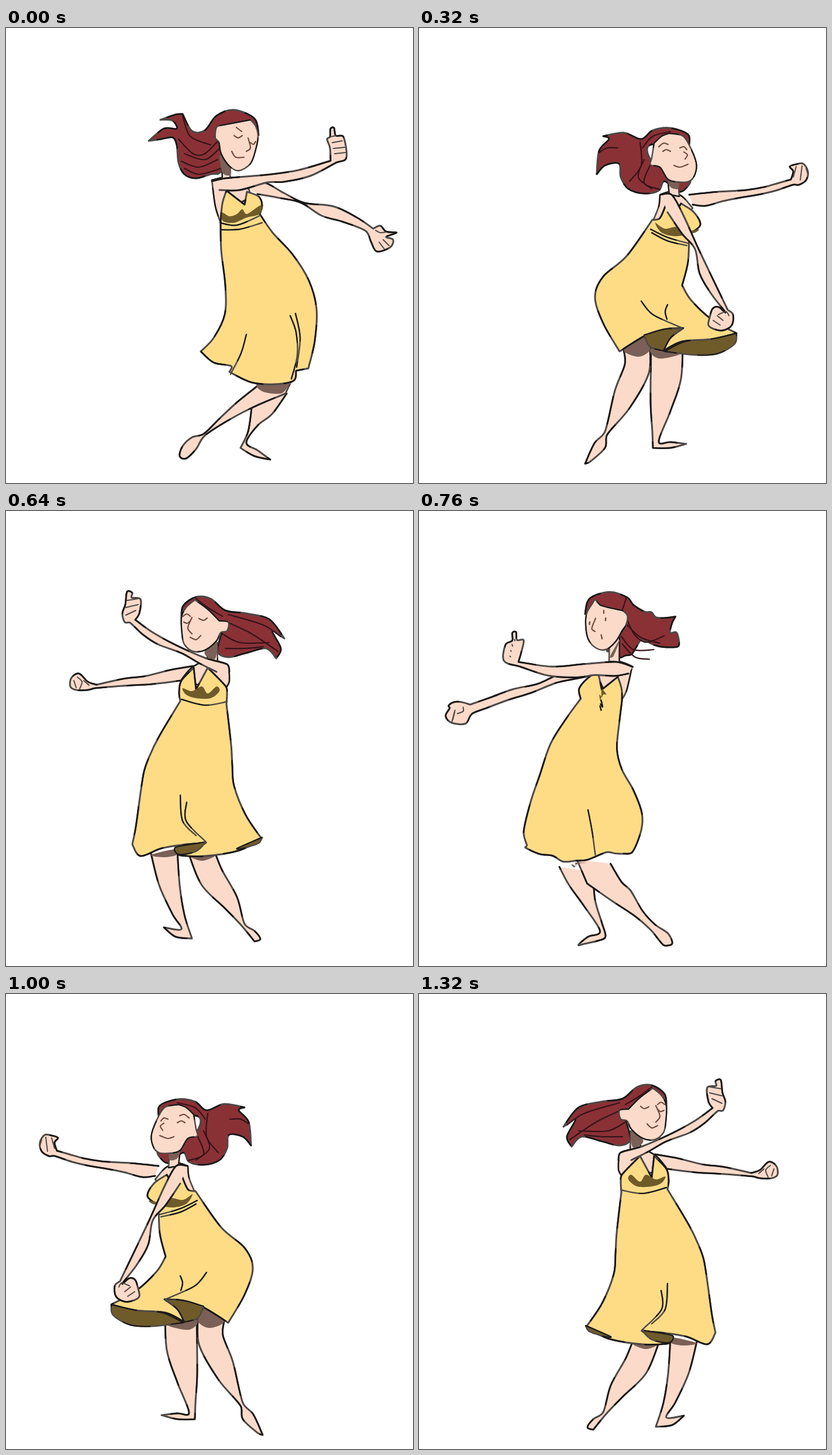
Animation, 696 px wide and 778 px high, one loop 1360 ms. Source, as an HTML page with a canvas:

```html
<!DOCTYPE html>
<html lang="en">
<head>
<meta charset="utf-8">
<title>Dance</title>
<style>
html, body { margin: 0; width: 100%; height: 100%; overflow: hidden; background: #fff; }
canvas { display: block; width: 100vw; height: 100vh; }
</style>
</head>
<body>
<canvas id="stage" width="696" height="778"></canvas>
<script>
const ctx = document.getElementById('stage').getContext('2d');
const SKIN = '#fcdac9', HAIR = '#8a3136', DRESS = '#fedc86', OLIVE = '#6f5a2a', SHADE = '#7a6056';
const HALF = 680, STEP = 80, MIRROR_X = 723, MIRROR_Y = 9;

// Back to front: part, fill, line width, closed outline
const LAYERS = [
  ['hair', HAIR, 3, true], ['strands', null, 2.2], ['far', SKIN, 3], ['farHand', null, 2],
  ['legR', SKIN, 3], ['legL', SKIN, 3], ['shade', SHADE, 0, true],
  ['torso', SKIN, 2.6, true], ['neck', SKIN, 2.4], ['neckShade', SHADE, 0, true],
  ['dress', DRESS, 3, true], ['under', OLIVE, 2.4, true], ['bust', OLIVE, 0, true], ['folds', null, 2.4],
  ['head', SKIN, 2.4, true], ['face', null, 2.2], ['near', SKIN, 3], ['nearHand', null, 2]
];

// Points run along smooth curves; * makes a corner, | starts a new curve
const leanBack = {
  hair: '432,183* 425,155 390,140 360,150 340,175 318,176 302,147* 290,148 264,157* 284,158 292,172 270,172 244,193* 265,190 285,187 292,200 295,230 305,250 325,257 350,250 367,246 372,215 365,185',
  strands: '365,190 340,215 320,215 295,190|366,205 340,225 305,215|362,225 330,238 300,228|368,240 330,250 305,240|302,150 315,185 350,200',
  far: '413,275* 440,264 475,282 510,299 560,305 600,324 628,343* 640,338 650,348 668,350 650,357 662,362 657,375 634,382 624,365 615,347 575,331 540,321 505,299 470,291 430,284*',
  farHand: '645,362 655,372|638,366 647,378|632,346 640,350 650,349',
  legL: '430,612* 395,640 365,668 338,694 318,700 302,715 297,732 308,736 325,720 340,697 385,668 430,645 478,625* 488,603*',
  legR: '420,650* 414,690 401,718* 425,732 452,738* 430,722 411,709 430,680 455,660 480,625*',
  shade: '428,610 440,622 470,625 483,612 492,600 450,604',
  torso: '352,260* 383,255 412,272 420,290* 400,300 375,330 367,333* 358,305',
  neck: '368,212 370,258* 383,258* 384,238',
  neckShade: '366,217 384,240 383,252 370,247',
  dress: '377,278* 408,302* 412,280* 432,288 438,303 434,318* 456,350 490,387 518,432 531,480 528,535 517,582* 496,586* 492,603 460,609 420,606 382,588* 385,578 355,572 333,553* 355,530 374,490 375,440 368,380 367,330* 370,300',
  bust: '370,316 382,322 395,318 404,310 412,318 436,303 434,318 412,324 390,333 371,330',
  folds: '366,333 395,337 436,320|411,524 402,556 384,592|368,345 400,344 438,333|486,492 496,520 498,560 488,600|495,488 503,530 497,580',
  head: '370,166* 418,157* 427,168 431,185 427,208 418,232 398,244 382,236 368,215 364,195 358,188 360,170',
  face: '418,196 423,199 427,194|390,184 397,188 404,184|414,188 418,205 411,211|386,211 393,221 407,221|394,170 403,177',
  near: '352,262* 375,257 445,251 500,243 555,227* 554,205 549,190 554,186 555,172 561,171 564,184 577,186 582,222 565,230 520,253 475,263 447,264 400,277 365,277',
  nearHand: '558,196 575,193|560,206 579,204|562,215 580,213|555,186 564,184'
};

const reach = {
  flip: true,
  hair: '277,160* 285,136 318,128 350,137 368,160 374,190 390,208 415,208 418,195* 427,215 428,235 410,257 385,264 355,262 330,245 325,235 300,250 288,235 287,222* 320,215 340,190',
  strands: '350,165 355,200 375,225 410,228|335,215 350,240 385,250|345,150 365,185 400,215|340,205 345,240 370,258|288,138 281,155',
  far: '305,250* 270,258 220,272 190,284 160,295 120,305 80,310* 60,306 45,297 46,307 32,308 30,330 45,340 70,336 82,320 120,319 160,305 200,292 250,280 270,276 290,272*',
  farHand: '45,310 55,318 48,332|37,312 42,325 36,335|60,316 68,326 58,335',
  legL: '362,585* 365,620 380,665 402,705 430,720 440,738 425,741 408,725 400,708 365,678 330,640 305,580*',
  legR: '292,576* 293,630 303,680 316,728* 295,733 274,737* 285,725 307,718 270,660 245,610 237,583*',
  shade: '240,584 290,572 290,598 265,602|300,573 362,585 345,592 310,590',
  torso: '358,262* 340,250 310,247 290,262* 300,300 337,305* 345,300',
  neck: '331,212 332,250* 310,247* 312,215',
  neckShade: '330,214 326,248 313,240 308,226',
  dress: '334,280* 310,300* 300,255* 275,285 262,298 264,315* 237,350 217,400 207,465 190,505 163,553* 158,560 185,578 230,584 262,587 272,578* 300,570 330,574 362,585* 370,530 372,470 365,415 345,385 329,365 330,335 338,312* 340,300',
  under: '158,556* 190,558 225,570 240,582* 200,579 170,568|262,588 268,575 290,572 280,583',
  bust: '264,303 285,306 300,303 315,308 330,300 338,297 335,306 310,314 290,313 268,312',
  folds: '264,318 300,324 336,318|266,489 271,530 264,575|267,325 300,328 334,325',
  head: '345,166* 318,157 298,138* 282,155 274,172 274,198 283,217 300,228 318,222 336,205 343,192 350,180',
  face: '278,178 283,180 288,176|305,174 312,178 320,173|295,170 294,180 286,188 290,192|286,203 296,207 309,200|303,161 312,164',
  near: '360,262* 325,250 290,263 230,280 172,280* 180,272 184,243 166,246 164,233 157,237 160,250 150,262 150,282 190,294 240,301 290,297 325,288 345,278 358,270',
  nearHand: '155,257 170,254|152,265 170,264|152,275 168,274|160,249 168,246'
};

const sway = {
  hair: '462,200* 460,182 430,171 400,175 380,190 350,179 315,185* 325,190 308,210 304,250* 318,235 342,232 345,255 358,275 385,283 410,278 420,262 445,280 460,270 463,258 440,250 400,230 395,200',
  strands: '395,235 385,265 412,276|385,225 375,255 398,275|378,195 380,235 360,262|308,213 322,205 340,205|382,205 400,185 430,177',
  far: '462,285* 500,281 530,279 560,277 590,272 615,265 636,259* 640,245 634,237 645,233 657,232 665,245 662,260 650,268 640,268 610,278 580,285 550,290 520,296 490,304 468,302*',
  farHand: '645,237 640,255|655,236 652,260|662,240 665,250',
  legL: '350,550* 352,575 335,620 318,690 300,710 284,745* 292,742 318,718 322,695 360,650 393,590 394,535*',
  legR: '397,540* 396,640 399,690 400,718* 430,718 457,711* 430,708 410,707 430,655 448,600 451,535*',
  shade: '350,550 385,528 395,550 375,562|397,548 450,538 450,556 410,565',
  torso: '412,285* 430,280 450,288 468,308* 455,320 425,330 400,330* 410,305',
  neck: '425,255 428,285* 445,288* 443,260',
  neckShade: '425,257 443,262 443,275 430,272',
  dress: '423,300* 437,320* 448,300* 470,315 481,337 462,352* 460,400 450,440* 465,465 500,498 543,522* 500,532 450,536 418,552* 430,530 452,513* 420,515 385,527 343,553* 315,505 301,460 315,425 355,390 399,328* 412,325',
  under: '385,525* 420,515 450,514* 430,530 418,552* 395,545|420,553* 455,536 500,532 543,522* 540,540 510,557 470,559',
  bust: '404,333 420,343 440,340 455,348 478,344 472,350 440,356 415,350',
  folds: '396,344 425,358 460,368|380,467 400,490 448,512|398,350 425,364 458,372|425,473 421,485 424,498',
  head: '402,197* 415,185 428,180* 450,184 461,198 474,230 472,250 462,262 440,263 425,258 412,238 396,234 398,222',
  face: '446,205 453,203 458,208|417,211 423,208 430,211|453,212 459,217 455,224|436,235 446,238 460,233|410,203 418,197 426,199',
  near: '413,285* 432,285 452,320 480,382 528,482* 537,490 535,508 520,517 505,515 495,508 497,495 502,480 512,477 524,486 500,455 480,420 472,378 450,352 425,315',
  nearHand: '512,490 525,485 530,492|510,492 520,500|503,500 515,508'
};

const point = {
  hair: '403,165* 395,148 372,135 340,137 315,160 314,185 325,210 333,222 313,240 325,262 294,262* 305,280 335,282 343,262 362,285 375,245 400,235 425,265 440,262 447,240 440,210 420,170',
  strands: '330,175 340,220 365,255|345,145 330,165 325,190|415,180 430,220 435,255|410,200 425,250|320,235 340,240 330,265',
  far: '405,215* 430,185 455,158 480,140 510,122 530,112 550,106* 565,101 610,108 609,131 600,130 590,134 578,130 565,123 556,117 530,138 495,158 480,163 455,185 435,212 410,240*',
  farHand: '592,110 595,130|603,110 604,130|580,120 588,133',
  legL: '301,523* 304,600 312,710 305,710 287,685* 292,708 305,722 318,726* 320,700 335,620 352,545*',
  legR: '380,548* 388,620 396,680 395,712* 402,718 425,700 434,681* 420,695 403,702 420,640 440,542*',
  shade: '302,519 345,517 350,545 320,542|382,546 440,542 436,552 400,558',
  torso: '362,243* 385,230 410,240 425,255* 400,265 370,290*',
  neck: '360,212 362,238* 392,240* 390,215',
  neckShade: '360,215 388,220 380,230',
  dress: '375,245* 392,265 405,258 408,243* 430,255 428,285 425,300* 433,350 445,400 460,470 464,520 473,549* 445,545 400,550 358,552 350,535 355,525 330,517 300,520 270,532 237,540* 265,505 282,460 290,430 310,400 330,375 350,330 366,295* 370,270',
  under: '237,540* 270,531 300,522* 302,553* 265,550|352,553 380,550 380,566 362,562|438,545 473,549 468,557 440,559|346,522 362,522 360,540 350,545',
  bust: '370,280 395,285 408,277 415,280 430,272 425,290 390,295 372,292',
  folds: '366,297 395,302 425,297|400,473 380,490 368,522',
  head: '344,178* 350,160 370,140* 395,160 406,178 405,200 390,218 375,222 360,215 350,203 338,198 334,185',
  face: '390,175 395,171 400,177|357,175 363,171 370,176|385,172 391,181 384,187|372,197 382,201 393,195|352,163 360,158 368,159',
  near: '365,243* 380,228 430,204 490,186 545,176* 560,180 590,190 606,200 603,205 590,203 583,213 565,212 560,200 545,182 500,206 460,213 435,215 400,228 372,245',
  nearHand: '575,196 590,200|570,205 578,210'
};

const turned = {
  hair: '300,183* 303,162 325,147 350,150 375,170 410,175 450,185 476,218* 455,205 470,235 462,252* 445,235 410,243 380,250 362,240 370,205 375,190',
  strands: '378,190 420,210 465,240|370,210 400,225 450,225|375,235 410,235 440,232|380,177 440,195 470,215|325,150 345,165 370,180',
  far: '320,265* 280,272 240,282 200,287 155,297* 140,292 125,278 112,285 110,300 120,306 140,306 152,303 200,299 250,296 298,290*',
  farHand: '122,284 130,292 126,304|116,290 120,302|133,290 142,298',
  legL: '248,586* 262,640 285,690 300,715 270,712* 290,728 318,731* 305,690 297,640 293,580*',
  legR: '313,588* 335,640 375,680 402,708 425,736* 435,732 425,718 408,706 395,660 370,615 358,586*',
  shade: '248,588 292,578 292,588 270,592|312,588 358,588 335,598',
  torso: '300,288* 320,266 350,255 378,265 382,290 378,300* 340,300',
  neck: '343,235 345,258* 362,260* 361,225',
  neckShade: '340,240 360,225 358,252 345,250',
  dress: '321,268* 325,305* 345,268* 376,300 378,312 377,330* 385,400 387,435 390,470 410,520 437,560* 400,580 340,590 295,588 320,580 342,567* 300,571 265,577 230,590 216,570* 222,540 235,450 245,420 262,385 298,325* 296,310 300,290',
  under: '290,575 342,566* 325,582 295,587|395,577 438,558* 432,568 400,578',
  bust: '302,303 318,308 335,300 345,312 360,300 365,308 350,320 325,320 308,314',
  folds: '300,322 340,332 378,326|309,498 308,530 342,566|298,486 302,530 325,555',
  head: '365,188* 345,168 323,152* 308,165 300,182 301,210 305,228 320,240 340,238 360,222 367,208 378,205 380,190',
  face: '304,190 310,192 315,188|330,184 338,187 344,183|318,182 311,200 318,210|315,216 325,220 333,213|303,180 309,176 315,180',
  near: '382,275* 378,262 340,251 290,229 250,207 221,186* 228,175 230,151 215,148 216,140 207,138 204,160 199,175 203,190 212,191 235,212 260,228 300,243 330,260 360,275',
  nearHand: '207,153 225,150|205,165 226,160|205,178 222,170'
};

const overhead = {
  hair: '385,165* 372,148 350,142 325,150 310,175 308,215 300,245 320,262 350,255 385,262 405,240 398,215 392,180',
  strands: '335,155 318,190 315,245|375,155 392,200 392,245',
  head: '325,190* 333,165 352,148* 375,165 384,190 382,210 365,230 350,233 335,225 327,212 322,200',
  face: '365,187 371,184 377,188|335,187 341,184 348,188|355,190 353,203 349,205|342,215 353,219 364,214',
  near: '330,262* 318,245 300,190 315,130 335,75* 335,50 345,35 358,40 360,60 348,80 335,130 325,190 345,250',
  far: '395,262* 400,240 425,190 412,130 385,75* 375,50 368,31 388,30 395,50 400,75 430,130 442,190 415,262',
  nearHand: '345,45 350,60', farHand: '380,38 384,52'
};

function parsePart(text = '', flip) {
  if (!text) return [];
  return text.split('|').map(curve => curve.split(' ').flatMap(word => {
    let [x, y] = word.split(',').map(parseFloat);
    if (flip) { x = MIRROR_X - x; y -= MIRROR_Y; }
    return word.endsWith('*') ? [[x, y], [x, y]] : [[x, y]];
  }));
}

const parsePose = pose => Object.fromEntries(
  LAYERS.filter(([name]) => pose[name]).map(([name]) => [name, parsePart(pose[name], pose.flip)]));

function between(a, b) {
  const mixed = {};
  for (const [name] of LAYERS) {
    if (!a[name] || !b[name]) continue;
    mixed[name] = a[name].slice(0, b[name].length).map((curve, k) => {
      const other = b[name][k];
      return curve.map(([x, y], i) => {
        const [u, v] = other[Math.round(i * (other.length - 1) / (curve.length - 1))];
        return [(x + u) / 2, (y + v) / 2];
      });
    });
  }
  return mixed;
}

function smooth(points, closed) {
  const path = new Path2D(), n = points.length;
  const at = i => closed ? points[(i + n) % n] : points[Math.max(0, Math.min(n - 1, i))];
  path.moveTo(...points[0]);
  for (let i = 0; i < (closed ? n : n - 1); i++) {
    const [a, b, c, d] = [at(i - 1), at(i), at(i + 1), at(i + 2)];
    const reach = 0.4 * Math.hypot(c[0] - b[0], c[1] - b[1]);
    const handle = (from, p, q, sign) => {
      const dx = (q[0] - p[0]) / 6, dy = (q[1] - p[1]) / 6;
      const k = sign * Math.min(1, reach / (Math.hypot(dx, dy) || 1));
      return [from[0] + dx * k, from[1] + dy * k];
    };
    path.bezierCurveTo(...handle(b, a, c, 1), ...handle(c, b, d, -1), ...c);
  }
  if (closed) path.closePath();
  return path;
}

// Grey brush line with darker overlapping strokes
function ink(path, width, name) {
  ctx.lineWidth = width;
  ctx.strokeStyle = name === 'face' ? '#70483f' : name === 'strands' ? '#351317' : '#4c4846';
  ctx.stroke(path);
  if (width < 2.4) return;
  ctx.setLineDash([48, 36]);
  ctx.lineWidth = width * 0.85;
  ctx.strokeStyle = '#171514';
  ctx.stroke(path);
  ctx.setLineDash([]);
}

function drawPose(pose) {
  for (const [name, fill, width, closed] of LAYERS) {
    for (const points of pose[name] || []) {
      const path = smooth(points, closed);
      if (fill) { ctx.fillStyle = fill; ctx.fill(path); }
      if (width) ink(path, width, name);
    }
  }
}

const keys = [leanBack, reach, sway, point, turned].map(parsePose);
const poses = keys.flatMap((key, i) => i < 4 ? [key, between(key, keys[i + 1])] : [key]);
Object.assign(poses[7], parsePose(overhead));
ctx.lineCap = ctx.lineJoin = 'round';

function frame(now) {
  const time = now % (2 * HALF);
  ctx.setTransform(1, 0, 0, 1, 0, 0);
  ctx.fillStyle = '#fff';
  ctx.fillRect(0, 0, 696, 778);
  if (time >= HALF) ctx.setTransform(-1, 0, 0, 1, MIRROR_X, MIRROR_Y);
  drawPose(poses[Math.floor(time % HALF / STEP)]);
  requestAnimationFrame(frame);
}
requestAnimationFrame(frame);
</script>
</body>
</html>
```
